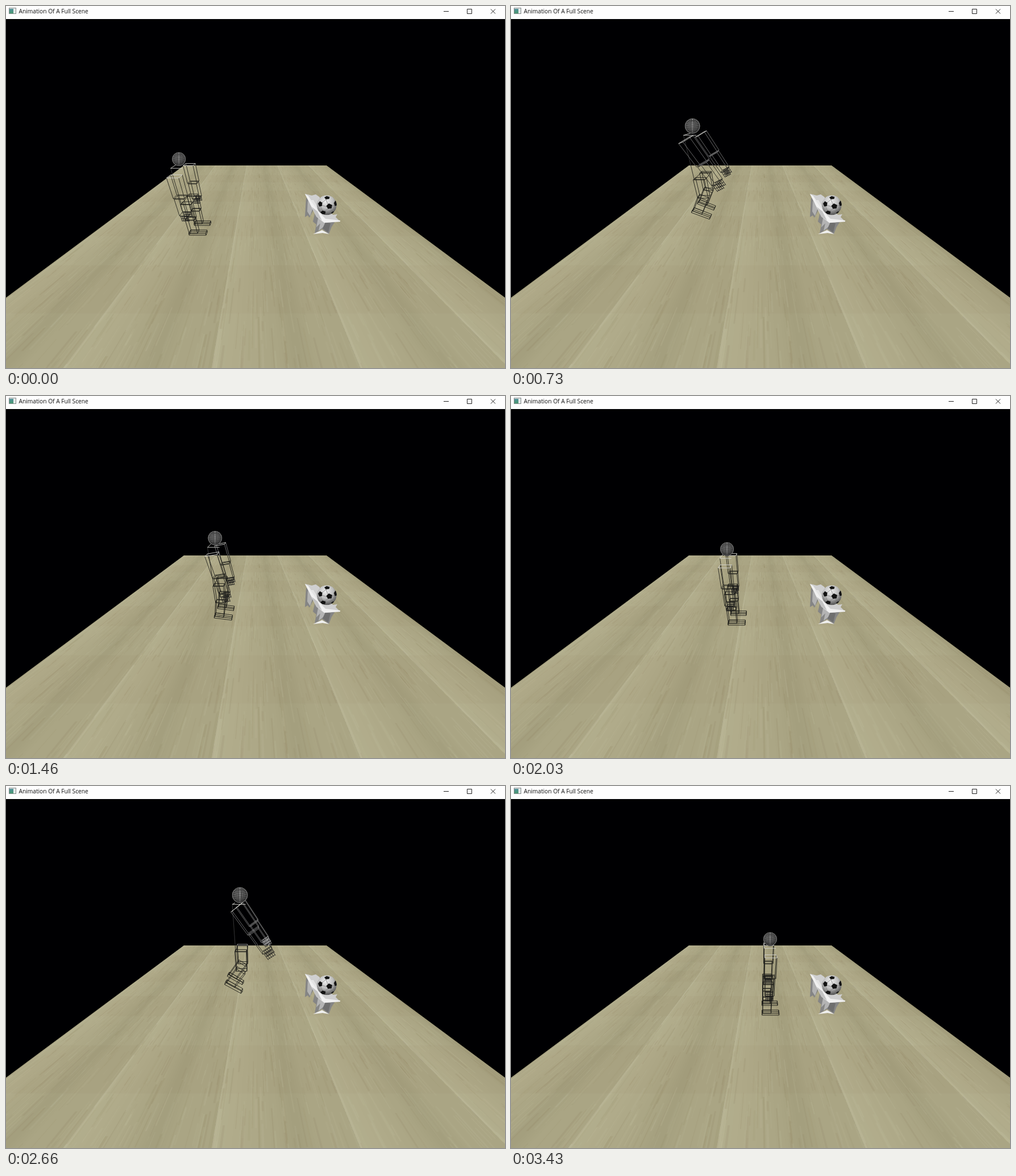
These frames come from a looping animation (878 px wide and 638 px high, 3.7 s). An HTML page with a canvas:

```html
<!DOCTYPE html>
<html lang="en">
<head>
<meta charset="utf-8">
<title>Animation Of A Full Scene</title>
<style>
  html, body { margin: 0; width: 100%; height: 100%; overflow: hidden; background: #000002; }
  canvas, svg { position: absolute; left: 0; top: 0; display: block; }
  text { font: 10.2px "Open Sans", "Noto Sans", sans-serif; fill: #111; }
  .wire path { fill: none; stroke-width: .9; }
</style>
</head>
<body>
<canvas id="floor" width="878" height="638"></canvas>
<svg width="878" height="638" viewBox="0 0 878 638">
  <defs>
    <clipPath id="onFloor"><path d="M313 281H564L878 514V638H0V514Z"/></clipPath>
    <clipPath id="offFloor"><path d="M313 281H564L878 514V0H0V514Z"/></clipPath>
    <clipPath id="ballClip"><circle cx="564.3" cy="351" r="17.5"/></clipPath>
    <radialGradient id="ballShade" cx=".45" cy=".3" r=".75">
      <stop offset="0" stop-color="#f0f0f0"/><stop offset=".5" stop-color="#bcbcbc"/><stop offset="1" stop-color="#3c3c3c"/>
    </radialGradient>
    <linearGradient id="headShade" x1="0" y1="0" x2=".5" y2="1">
      <stop offset="0" stop-color="#b4b4b4"/><stop offset="1" stop-color="#686868"/>
    </linearGradient>
    <linearGradient id="icon" x1="0" y1="0" x2="0" y2="1">
      <stop offset="0" stop-color="#4f8f9a"/><stop offset="1" stop-color="#4b9a72"/>
    </linearGradient>
  </defs>

  <rect width="878" height="23" fill="#fefefe"/>
  <rect x="5.5" y="3.5" width="12" height="10" fill="#e4e8e8" stroke="#858b8b"/>
  <rect x="6" y="5" width="7" height="8" fill="url(#icon)"/>
  <text x="22.5" y="13">Animation Of A Full Scene</text>
  <path d="M770 9.5H779M811.5 5.5H819.5V13.5H811.5ZM853 5.5L861 13.5M861 5.5L853 13.5" fill="none" stroke="#222"/>

  <g id="table">
    <path d="M528 338L526 372 531 369 534 373 545 351Z" fill="#848484"/>
    <path d="M531 343L530 362 535 370 540 356Z" fill="#b2b2b2"/>
    <path d="M544 363L540 380 546 385 543 401 556 393 568 402 573 389 579 380Z" fill="#858585"/>
    <path d="M549 374L546 390 553 383 550 396 559 389 566 381Z" fill="#b4b4b4"/>
    <path d="M562 381L557 392 567 399 571 383Z" fill="#6e6e6e"/>
    <path d="M540 402L556 395 569 402 557 400Z" fill="#efefef"/>
    <path d="M526 331L538 334 545 332 552 337 553 356 576 368 583 367 580 372 588 380 560 382 547 372 538 355Z" fill="#cfcfcf"/>
    <path d="M526 331L532 335 549 361 562 375 588 378 588 380 560 382 546 371Z" fill="#f0f0f0"/>
    <path d="M535 342L541 342 550 358 549 361Z" fill="#e4e4e4"/>
    <path d="M538 354L546 371 556 378 548 362Z" fill="#c2c2c2"/>
  </g>
  <g clip-path="url(#ballClip)">
    <circle cx="564.3" cy="351" r="17.5" fill="url(#ballShade)"/>
    <path d="M563 341L568 354M552 350L565 354M579 350L571 354M558 363L567 357M575 366L571 357M552 350L558 363 575 366 579 350M563 341L552 350" fill="none" stroke="#777" stroke-width=".7"/>
    <g id="patches" fill="#111"></g>
  </g>

  <g class="wire" clip-path="url(#offFloor)">
    <path id="bodyAir" stroke="#3c3c3c"/><path id="armAir" stroke="#757575"/>
    <path id="legAir" stroke="#777"/><path id="handAir" stroke="#aaa"/>
  </g>
  <g class="wire" clip-path="url(#onFloor)">
    <path id="bodyFloor" stroke="#24241f"/><path id="armFloor" stroke="#24241f"/>
    <path id="legFloor" stroke="#1d1d19"/><path id="handFloor" stroke="#1b1b1b"/>
  </g>
  <g class="wire"><path id="lit" stroke="#d4d4d0"/></g>
  <g id="head">
    <circle r="8.9" fill="url(#headShade)"/>
    <g id="mesh" fill="none" stroke="#1c1c1c" stroke-width=".55"></g>
    <circle r="8.7" fill="none" stroke="#aaa" stroke-width=".5"/>
  </g>
</svg>

<script>
const $ = id => document.getElementById(id);
const CX = 438.5, CY = 330, HORIZON = 187, FOCAL = 255, SIN = .49, COS = .87;
const DEG = Math.PI / 180;

// ---- wooden floor ----
function paintFloor() {
  const g = $("floor").getContext("2d");
  let seed = 7;
  const rnd = () => (seed = seed * 16807 % 2147483647) / 2147483647;
  const ray = (u, y) => CX + u * (y - HORIZON);
  const wedge = (u0, u1, y0, y1, color) => {
    g.fillStyle = color;
    g.beginPath();
    g.moveTo(ray(u0, y0), y0);
    g.lineTo(ray(u1, y0), y0);
    g.lineTo(ray(u1, y1), y1);
    g.lineTo(ray(u0, y1), y1);
    g.fill();
  };
  const EDGE = 1.345, PLANK = .58;
  g.beginPath();
  g.moveTo(313, 281); g.lineTo(564, 281); g.lineTo(878, 514);
  g.lineTo(878, 638); g.lineTo(0, 638); g.lineTo(0, 514);
  g.clip();
  g.fillStyle = "#a9a483";
  g.fillRect(0, 281, 878, 357);

  for (let u = -1.33; u < EDGE; u += PLANK) {
    for (let i = 0; i < 10; i++)
      wedge(u, u + .026 * i, 281, 638, "rgba(188,187,158,.035)");
    wedge(u, u + .012, 281, 638, "rgba(194,194,166,.25)");
    for (let i = 0; i < 6; i++)
      wedge(u + .27 + .012 * i, u + .42 - .012 * i, 281, 638, "rgba(140,124,88,.03)");
  }
  // Rows of the repeated texture, evenly spaced in depth
  for (let k = 0; k < 9; k++) {
    const near = HORIZON + 1 / (.00194 + .00088 * k), far = HORIZON + 1 / (.00282 + .00088 * k);
    wedge(-EDGE, EDGE, far, near, k % 2 ? "rgba(120,110,76,.03)" : "rgba(190,190,162,.03)");
  }
  for (let i = 0; i < 3000; i++) {
    const u = -EDGE + rnd() * EDGE * 2, depth = .002 + rnd() * .0085;
    const y0 = HORIZON + 1 / (depth + .0001 + rnd() * .0005), y1 = HORIZON + 1 / depth;
    const tone = rnd() < .55 ? "198,197,168" : "128,114,80";
    wedge(u, u + .003 + rnd() * .008, y0, y1, `rgba(${tone},${.04 + rnd() * .1})`);
  }
}

// ---- ball patches and head mesh ----
function buildStatic() {
  const spots = [[565, 338, 5, 3], [553, 349, 4, 5], [569, 353, 5.5, 5], [580, 348, 3, 5], [558, 364, 5, 3.5], [576, 365, 4, 3]];
  $("patches").innerHTML = spots.map(([x, y, rx, ry]) => {
    const pts = [0, 1, 2, 3, 4].map(i => {
      const a = (i * 72 - 100) * DEG;
      return `${x + rx * Math.cos(a)},${y + ry * Math.sin(a)}`;
    });
    return `<polygon points="${pts.join(" ")}"/>`;
  }).join("");

  let mesh = "";
  for (let i = 0; i < 7; i++) {
    const s = Math.sin(i * 13 * DEG) * 8.9;
    mesh += `<ellipse rx="${s}" ry="8.9"/>`;
  }
  for (let i = -5; i <= 5; i++) {
    const a = i * 15 * DEG, r = 8.7 * Math.cos(a), y = 8.2 * Math.sin(a);
    mesh += `<path d="M${-r} ${y}Q0 ${y + 2.5} ${r} ${y}"/>`;
  }
  $("mesh").innerHTML = mesh;
}

// ---- figure: x forward, h up, z away from the viewer ----
function project(x, h, z) {
  const depth = FOCAL - SIN * h + COS * z, k = FOCAL / depth;
  return [CX + k * x, CY - k * (-65 + COS * h + SIN * z), k];
}

const turn = (px, ph, deg) => {
  const c = Math.cos(deg * DEG), s = Math.sin(deg * DEG);
  return (x, h) => [px + (x - px) * c - (h - ph) * s, ph + (x - px) * s + (h - ph) * c];
};
const still = (x, h) => [x, h];

function figure(baseX, lift, p) {
  const out = { body: "", arm: "", leg: "", hand: "", lit: "" };
  const line = (to, pose, dh, a, b) => {
    const [s, e] = [a, b].map(([x, h, z]) => {
      const [px, ph] = pose(x, h);
      return project(baseX + px, ph + lift + dh, z);
    });
    out[to] += `M${s[0].toFixed(1)} ${s[1].toFixed(1)}L${e[0].toFixed(1)} ${e[1].toFixed(1)}`;
  };
  const ring = (to, pose, dh, [x0, x1], h, [z0, z1]) => {
    const c = [[x0, h, z0], [x1, h, z0], [x1, h, z1], [x0, h, z1]];
    c.forEach((q, i) => line(to, pose, dh, q, c[(i + 1) % 4]));
  };
  const box = (to, top, pose, dh, xs, [h0, h1], zs) => {
    ring(to, pose, dh, xs, h0, zs);
    ring(top, pose, dh, xs, h1, zs);
    for (const x of xs) for (const z of zs) line(to, pose, dh, [x, h0, z], [x, h1, z]);
  };

  // Only the back edge of the torso shows between its two ends
  const torsoX = [2, 17], torsoZ = [-11, 15];
  line("lit", still, 0, [2, 118, -11], [17, 118, -11]);
  line("lit", still, 0, [2, 118, -11], [2, 118, 15]);
  ring("leg", still, 0, torsoX, 62, torsoZ);
  line("body", still, 0, [2, 62, -11], [2, 118, -11]);

  const arm = zs => {
    const pose = turn(10, 108, 38 * p), dh = 6 * p;
    box("arm", "lit", pose, dh, [2.5, 17.5], [81, 111], zs);
    box("arm", "arm", pose, dh, [3.5, 16.5], [52, 80], zs);
    for (const z of zs) {
      for (let i = 0; i < 5; i++) line("hand", pose, dh, [5 + i * 2.6, 52, z], [5 + i * 2.6, 42, z]);
      for (let i = 0; i < 3; i++) line("hand", pose, dh, [5, 51 - i * 4, z], [15.4, 51 - i * 4, z]);
    }
  };
  const leg = zs => {
    const shin = turn(8, 33, -38 * p);
    box("leg", "leg", still, 0, [1, 16], [33, 62], zs);
    box("leg", "leg", shin, 0, [1, 15], [4, 32], zs);
    box("leg", "leg", shin, 0, [0, 28.5], [0, 4], zs);
  };
  arm([21, 31]);
  leg([12, 20]);
  leg([-12, -4]);
  arm([-26, -16]);
  return out;
}

const LOOP = 3700, JUMP = 1300, STEP = 33.3;
const jumps = [
  [[260, 500], [800, 500], [1330, 300]],
  [[2030, 500], [2560, 500], [3100, 300]]
];
const elapsed = (bursts, t) => bursts.reduce((sum, [start, length]) => {
  const e = Math.max(0, Math.min(length, t - start));
  return sum + (e === length ? length : Math.floor(e / STEP + .5) * STEP);
}, 0);

function render(t) {
  const [a, b] = jumps.map(j => elapsed(j, t));
  const active = b > 0 ? b : a;
  const p = 1 - Math.abs(active - JUMP / 2) / (JUMP / 2);
  const baseX = -111.5 + 57.35 * (a + b) / JUMP, lift = 56 * p;
  const wires = figure(baseX, lift, p);
  for (const kind of ["body", "arm", "leg", "hand"])
    for (const place of ["Air", "Floor"]) $(kind + place).setAttribute("d", wires[kind]);
  $("lit").setAttribute("d", wires.lit);
  const [x, y, k] = project(baseX + 10, 127 + lift, 0);
  $("head").setAttribute("transform", `translate(${x} ${y}) scale(${k})`);
}

paintFloor();
buildStatic();
const begin = performance.now();
function tick() {
  render((performance.now() - begin) % LOOP);
  requestAnimationFrame(tick);
}
tick();
</script>
</body>
</html>
```
